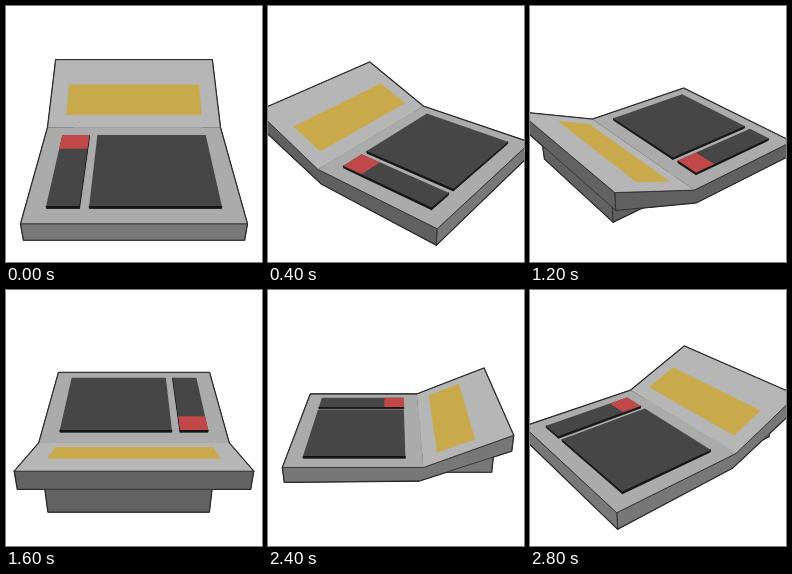
An HTML page for the animation above (3.2 s loop, 256 px wide and 256 px high).

```html
<!DOCTYPE html>
<html lang="en">
<head>
<meta charset="utf-8">
<title>Turntable console</title>
<style>
  html, body { margin: 0; width: 100%; height: 100%; overflow: hidden; background: #fff; }
  svg { display: block; width: 100%; height: 100%; }
</style>
</head>
<body>
<svg id="stage" viewBox="0 0 256 256"></svg>
<script>
const stage = document.getElementById('stage');
const STEP = 400, VIEWS = 8;
const FOCAL = 484, HEIGHT = 2.88, ORBIT_X = 5.6, ORBIT_Z = 4.43;

// Profile of the body: flat desk, hinge, rising panel
const FRONT = 1.28, HINGE = -0.31, BACK = -1.28;
const DESK = -0.113, PEAK = 0.302, THICK = 0.2, LIFT = 0.03;
const INK = '#101010', CREASE = '#2b2b2b';
const LEFT = '#606060', RIGHT = '#777777', NEAR = '#787878', FAR = '#626262';

// The camera circles the model on an ellipse and always looks at the centre
function makeCamera(angle) {
  const cx = ORBIT_X * Math.sin(angle), cz = ORBIT_Z * Math.cos(angle);
  const reach = Math.hypot(cx, cz), dist = Math.hypot(reach, HEIGHT);
  const sinA = cx / reach, cosA = cz / reach;
  const sinP = HEIGHT / dist, cosP = reach / dist;
  return ([x, y, z]) => {
    const side = x * cosA + z * sinA, near = z * cosA - x * sinA;
    const k = FOCAL / (dist - near * cosP - y * sinP);
    return [128 + side * k, 128 - (y * cosP - near * sinP) * k];
  };
}

function signedArea(pts) {
  return pts.reduce((sum, [x, y], i) => {
    const [u, v] = pts[(i + 1) % pts.length];
    return sum + x * v - u * y;
  }, 0);
}

function render(view) {
  const angle = view * 2 * Math.PI / VIEWS;
  const project = makeCamera(angle);
  let faces = '', outline = '';

  // Faces run clockwise as seen from outside; others are hidden
  function face(points, fill, line = 'none') {
    const pts = points.map(project);
    if (signedArea(pts) <= 0) return;
    const list = pts.map(p => p.map(n => n.toFixed(2)).join()).join(' ');
    faces += `<polygon points="${list}" fill="${fill}" stroke="${line}"/>`;
    if (line === CREASE) outline += `<polygon points="${list}"/>`;
  }

  // Top rectangle, back-left corner first
  const flat = (x0, x1, z0, z1, y0, y1 = y0) =>
    [[x0, y0, z0], [x1, y0, z0], [x1, y1, z1], [x0, y1, z1]];

  function walls(x0, x1, z0, z1, y0, y1, colors, line) {
    const corners = [[x0, z1], [x1, z1], [x1, z0], [x0, z0]];
    corners.forEach(([x, z], i) => {
      const [u, w] = corners[(i + 1) % 4];
      face([[x, y1, z], [u, y1, w], [u, y0, w], [x, y0, z]], colors[i], line);
    });
  }

  function plate(x0, x1, z0, z1) {
    walls(x0, x1, z0, z1, DESK, DESK + LIFT, Array(4).fill('#161616'), '#161616');
    face(flat(x0, x1, z0, z1, DESK + LIFT), '#464646');
  }

  // Solid foot below the panel
  walls(-0.7, 0.8, -1.13, HINGE, -0.308, 0, [NEAR, RIGHT, FAR, LEFT], CREASE);

  // Body sides and ends
  const profile = [[DESK, FRONT], [DESK, HINGE], [PEAK, BACK],
    [PEAK - THICK, BACK], [-0.295, -0.27], [DESK - THICK, FRONT]];
  face(profile.map(([y, z]) => [1, y, z]), RIGHT, CREASE);
  face(profile.map(([y, z]) => [-1, y, z]).reverse(), LEFT, CREASE);
  const end = (z, y, dir, fill) =>
    face([[-dir, y, z], [dir, y, z], [dir, y - THICK, z], [-dir, y - THICK, z]], fill, CREASE);
  end(FRONT, DESK, 1, NEAR);
  end(BACK, PEAK, -1, FAR);

  // Upper surfaces, with one outline around both
  face(flat(-1, 1, HINGE, FRONT, DESK), '#ababab');
  face(flat(-1, 1, BACK, HINGE, PEAK, DESK), '#b6b6b6');
  face([[-1, PEAK, BACK], [1, PEAK, BACK], [1, DESK, HINGE],
    [1, DESK, FRONT], [-1, DESK, FRONT], [-1, DESK, HINGE]], 'none', CREASE);

  const onPanel = v => [HINGE + (BACK - HINGE) * v, DESK + (PEAK - DESK) * v];
  const [za, ya] = onPanel(0.61), [zb, yb] = onPanel(0.17);
  face(flat(-0.8, 0.8, za, zb, ya, yb), '#c8aa4c');

  const plates = [() => plate(-0.41, 0.803, -0.109, 1.08), () => {
    plate(-0.803, -0.5, -0.109, 1.08);
    face(flat(-0.803, -0.5, -0.109, 0.165, DESK + LIFT), '#c04848');
  }];
  if (Math.sin(angle) < 0) plates.reverse();
  plates.forEach(draw => draw());

  stage.innerHTML = `<g stroke-linejoin="round">
    <g fill="${INK}" stroke="${INK}" stroke-width="1.6">${outline}</g>
    <g stroke-width="0.8">${faces}</g></g>`;
}

let shown = -1;
const start = performance.now();
function tick(now) {
  const view = Math.floor(Math.max(0, now - start) / STEP) % VIEWS;
  if (view !== shown) render(shown = view);
  requestAnimationFrame(tick);
}
tick(start);
</script>
</body>
</html>
```
